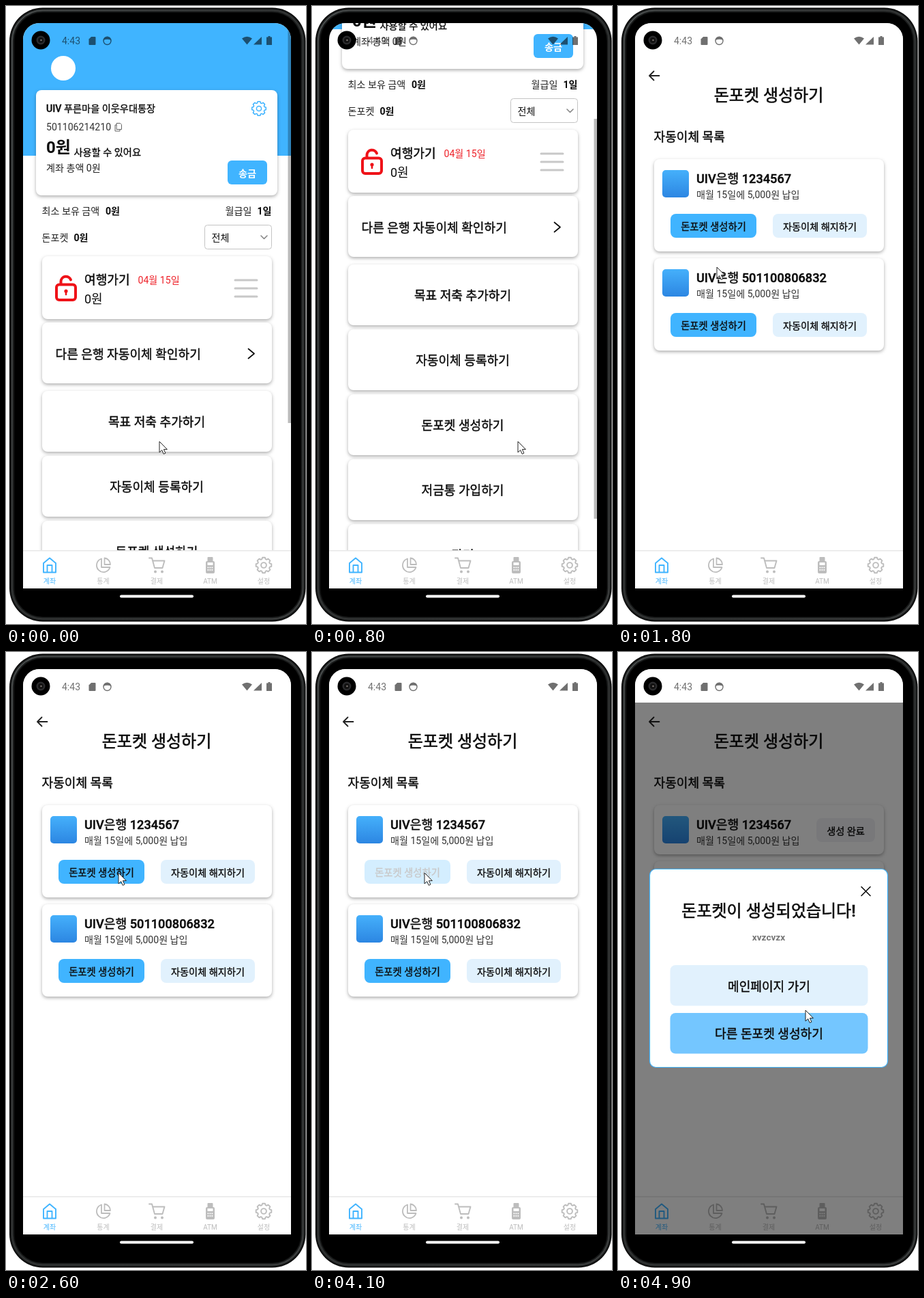
An HTML page for the animation above (5000 ms loop, 440 by 904 pixels).

```html
<!DOCTYPE html>
<html lang="ko">
<head>
<meta charset="utf-8">
<style>
html, body { margin: 0; width: 100%; height: 100%; overflow: hidden; background: #fff; }
svg { display: block; width: 440px; height: 904px; }
text { font-family: Roboto, "Noto Sans CJK KR", "Noto Sans CJK", sans-serif; white-space: pre; }
.card { fill: #fff; filter: drop-shadow(0 2px 2.5px rgba(0, 0, 0, .32)); }
.line { fill: none; stroke-linecap: round; stroke-linejoin: round; }
</style>
</head>
<body>
<svg id="stage" viewBox="0 0 440 904" xmlns="http://www.w3.org/2000/svg"></svg>
<script>
const BLUE = '#40b4ff', PALE = '#e1f1fd', GREY = '#bdbdbd', INK = '#0c0c0c';
const LOOP = 5000, STEP = 100;

// cy is the visual middle; medium weight gets a hairline, as Hangul has no medium cut
const text = (x, cy, size, weight, str, fill = INK, anchor = 'start') =>
  `<text x="${x}" y="${cy + size * .385}" font-size="${size}" font-weight="${weight}" fill="${fill}" text-anchor="${anchor}"` +
  (weight === 500 ? ` stroke="${fill}" stroke-width="${size * .024}"` : '') + `>${str}</text>`;
const mid = (x, cy, size, weight, str, fill) => text(x, cy, size, weight, str, fill, 'middle');
const box = (x, y, w, h, r, fill, more = '') =>
  `<rect x="${x}" y="${y}" width="${w}" height="${h}" rx="${r}" fill="${fill}" ${more}/>`;
const card = (x, y, w, h) => `<rect class="card" x="${x}" y="${y}" width="${w}" height="${h}" rx="8"/>`;
const line = (d, stroke, width) => `<path class="line" d="${d}" stroke="${stroke}" stroke-width="${width}"/>`;
const dot = (x, y, r, fill) => `<circle cx="${x}" cy="${y}" r="${r}" fill="${fill}"/>`;
const group = (id, body, more = '') => `<g id="${id}" ${more}>${body}</g>`;

function gear(x, y, r, color, width) {
  const pts = [];
  for (let i = 0; i < 8; i++) {
    for (const [off, k] of [[-.3, .8], [-.17, 1], [.17, 1], [.3, .8]]) {
      const a = i * Math.PI / 4 + off;
      pts.push((x + r * k * Math.cos(a)).toFixed(1) + ' ' + (y + r * k * Math.sin(a)).toFixed(1));
    }
  }
  return line('M' + pts.join('L') + 'Z', color, width) +
    `<circle cx="${x}" cy="${y}" r="${r * .34}" fill="none" stroke="${color}" stroke-width="${width}"/>`;
}

function menuCard(y, label) {
  return card(53, y, 337, 89) + mid(221, y + 45, 18.1, 500, label);
}

function home() {
  return box(25, -200, 393, 419, 0, BLUE) +
    dot(84, 91, 18, '#fff') +
    card(44, 123, 354, 154) +
    text(59, 150, 14.2, 500, 'UIV 푸른마을 이웃우대통장') +
    gear(371, 150, 10.5, BLUE, 1.5) +
    text(59, 177, 14.1, 400, '501106214210', '#333') +
    line('M162.500 171.500h5l2 2v7h-7zM162 174h-2v9h7v-2', '#666', 1) +
    text(59, 206, 24, 700, '0원') +
    text(99.500, 214, 14.2, 500, '사용할 수 있어요') +
    text(59, 237, 14.1, 400, '계좌 총액 0원', '#222') +
    box(325, 226, 58, 35, 6, BLUE) +
    mid(354, 245, 14.2, 700, '송금', '#fff') +
    text(52.500, 300, 14.1, 400, '최소 보유 금액', '#222') +
    text(146, 300, 14.1, 700, '0원') +
    text(321.500, 300, 14.1, 400, '월급일', '#222') +
    text(368.500, 300, 14.1, 700, '1일') +
    text(52.500, 339, 14.1, 400, '돈포켓', '#222') +
    text(99.500, 339, 14.1, 700, '0원') +
    box(291.500, 320.500, 98, 35, 4, '#fff', 'stroke="#c4c4c4"') +
    text(301.500, 339, 14.1, 400, '전체') +
    line('M374 336l4.500 4.500 4.500-4.500', '#888', 1.6) +
    card(53, 366, 337, 92) +
    box(74, 407.500, 28, 22.500, 4, 'none', 'stroke="#ef1218" stroke-width="4"') +
    line('M80.500 406v-3a7.500 7.500 0 0 1 14.500-2.500', '#ef1218', 4) +
    dot(88, 417, 2.6, '#ef1218') + line('M88 418v4', '#ef1218', 2.6) +
    text(115, 400, 18.1, 500, '여행가기') +
    text(193.500, 401, 14.1, 400, '04월 15일', '#ee2028') +
    text(115, 428, 18, 400, '0원') +
    line('M336 401h32M336 413h32M336 425h32', '#c8c8c8', 3) +
    card(53, 463, 337, 89) +
    text(72.500, 509, 18.1, 500, '다른 은행 자동이체 확인하기') +
    line('M355.500 501.500l8.500 7-8.500 7', INK, 1.7) +
    ['목표 저축 추가하기', '자동이체 등록하기', '돈포켓 생성하기', '저금통 가입하기', '관리']
      .map((s, i) => menuCard(563 + 95 * i, s)).join('');
}

function account(y, number, h, action) {
  return card(53, y, 337, h) +
    box(65, y + 16, 39, 40, 5, 'url(#tile)') +
    text(115, y + 28, 18.2, 500, 'UIV은행 ' + number) +
    text(115, y + 52, 14.1, 400, '매월 15일에 5,000원 납입', '#333') + action;
}

function actions(y, id) {
  return group(id, box(77, y + 80, 126, 35, 8, BLUE) + mid(140, y + 98.500, 14.3, 500, '돈포켓 생성하기')) +
    box(227, y + 80, 138, 35, 8, PALE) + mid(296, y + 98.500, 14.2, 500, '자동이체 해지하기');
}

function list() {
  const doneTag = box(291, 243, 86, 35, 8, '#f1f2f6') + mid(334, 262, 14.2, 500, '생성 완료');
  return box(25, 25, 393, 827, 0, '#fff') +
    line('M60.500 102H46M52.500 95.500L46 102l6.500 6.500', '#222', 1.8) +
    mid(221, 130, 24, 500, '돈포켓 생성하기') +
    text(52.500, 191, 18.1, 500, '자동이체 목록') +
    group('open', account(224, '1234567', 135, actions(224, 'press'))) +
    group('done', account(224, '1234567', 72, doneTag)) +
    group('second', account(369, '501100806832', 135, actions(369, 'other')));
}

function tabs() {
  const names = ['계좌', '통계', '결제', 'ATM', '설정'];
  return box(25, 797, 393, 55, 0, '#fff') + box(25, 796, 393, 1.5, 0, '#e8e8e8') +
    line('M55 815l9-7.500 9 7.500v13.500H55zM60.500 828v-10h7v10', BLUE, 1.9) +
    line('M140 808.500a10 10 0 1 0 12.500 12.500H140zM144.500 807.500v9.500h8.500a9.500 9.500 0 0 0-8.500-9.500z', GREY, 1.8) +
    line('M210 807.500h4l4 14.500h11.500l3-10.500h-17', GREY, 1.9) +
    dot(219, 827.500, 2, GREY) + dot(229, 827.500, 2, GREY) +
    box(293, 812, 13, 18, 2, GREY) + box(295.500, 806, 8, 7, 1, GREY) + box(295.500, 814, 8, 4, .5, '#fff') +
    [0, 1, 2, 3, 4, 5].map(i => box(295.500 + i % 3 * 3, 820.500 + (i / 3 | 0) * 3.500, 1.8, 1.8, 0, '#fff')).join('') +
    gear(378, 818, 11.500, GREY, 1.9) +
    names.map((s, i) => mid(64 + 78.500 * i, 841, 10, 400, s, i ? GREY : BLUE)).join('');
}

function status() {
  const c = '#000';
  return text(82, 51, 14, 400, '4:43', c) +
    `<path fill="${c}" d="M125 45h5.500q1 0 1 1v10q0 1-1 1h-8q-1 0-1-1v-7.500z"/>` +
    `<circle cx="148.500" cy="51" r="5.500" fill="none" stroke="${c}" stroke-width="1.4"/>` +
    `<path fill="${c}" d="M143 50a5.500 5.500 0 0 1 11 0q-5.500-2.500-11 0z"/>` +
    `<path fill="${c}" d="M346 47.500q7.500-5.500 15 0l-7.500 9zM375 45v11.500h-12z"/>` +
    `<path fill="${c}" d="M384.500 44h3v1.500h2.500V57h-8V45.500h2.500z"/>`;
}

function modal() {
  return box(25, 74, 393, 778, 0, '#000', 'fill-opacity=".5"') +
    box(46.500, 317.500, 349, 290, 9, '#fff', `stroke="${BLUE}" stroke-width="1.2"`) +
    line('M357 343.500l13 13M370 343.500l-13 13', INK, 1.6) +
    mid(221, 378, 24, 500, '돈포켓이 생성되었습니다!') +
    mid(221, 417, 13.600, 700, 'xvzcvzx', '#777') +
    box(76.500, 458, 290, 59.500, 8, PALE) + mid(221.500, 489, 18.1, 500, '메인페이지 가기') +
    box(76.500, 528, 290, 59.500, 8, '#74c6ff') + mid(221.500, 558.500, 18.1, 500, '다른 돈포켓 생성하기');
}

function phone() {
  return box(5, 2.500, 434.500, 898, 49, '#080808') +
    box(9, 6.500, 426.500, 890, 45, 'none', 'stroke="#1e2020" stroke-width="5"') +
    box(9, 6.500, 426.500, 890, 45, 'none', 'stroke="url(#rim)" stroke-width="1.500"') +
    box(13, 10, 419, 883, 41, '#000');
}

const stage = document.getElementById('stage');
stage.innerHTML = `<defs>
  <clipPath id="screen"><path d="M25 852V49a24 24 0 0 1 24-24h345a24 24 0 0 1 24 24v803z"/></clipPath>
  <linearGradient id="rim" x2="1" y2="1"><stop stop-color="#505454"/><stop offset=".5" stop-color="#343636"/><stop offset="1" stop-color="#424444"/></linearGradient>
  <linearGradient id="tile" x2="0" y2="1"><stop stop-color="#45b0fb"/><stop offset="1" stop-color="#2c86e2"/></linearGradient>
</defs>` + phone() +
  group('view',
    box(25, 25, 393, 827, 0, '#fff') +
    group('home', group('scroll', home()) + box(413.500, 25, 4.500, 585, 0, '#000', 'id="thumb" fill-opacity=".27"')) +
    group('list', list()) + tabs() +
    group('status', status(), 'opacity=".56"') + group('modal', modal()),
    'clip-path="url(#screen)"') +
  dot(51, 50, 13.500, '#000') + dot(51, 50, 6.500, '#2b2b2d') + dot(51, 50, 4, '#111') + dot(51.500, 50, 1.3, '#77706c') +
  box(167, 861.500, 108, 4, 2, '#fff') +
  group('cursor', '<path d="M0 0v16l3.700-3.400 2.500 5.700 2.700-1.200-2.500-5.500h5z" fill="#fff" stroke="#222" stroke-width="1" stroke-linejoin="round"/>');

const el = id => document.getElementById(id);
const [scroll, thumb, homeView, listView, open, done, second, press, sheet, cursor] =
  ['scroll', 'thumb', 'home', 'list', 'open', 'done', 'second', 'press', 'modal', 'cursor'].map(el);

const PATH = [[0, 225, 637], [100, 225, 637], [700, 302, 637], [1100, 302, 637], [1800, 145, 382],
  [2400, 165, 323], [4200, 165, 323], [4500, 198, 386], [4900, 275, 524]];
const OPEN_LIST = 1000, PRESS = 4000, CREATED = 4300;

const part = (t, from, to) => Math.min(1, Math.max(0, (t - from) / (to - from)));
const smooth = p => p * p * (3 - 2 * p);
const move = (node, x, y) => node.setAttribute('transform', `translate(${x} ${y})`);
const show = (node, on) => node.setAttribute('display', on ? 'inline' : 'none');

function cursorAt(t) {
  let i = 0;
  while (i < PATH.length - 2 && t >= PATH[i + 1][0]) i++;
  const [t0, x0, y0] = PATH[i], [t1, x1, y1] = PATH[i + 1];
  const p = smooth(part(t, t0, t1));
  return [x0 + (x1 - x0) * p, y0 + (y1 - y0) * p];
}

function draw(t) {
  const top = 185 * smooth(part(t, 100, 700));
  const created = t >= CREATED;
  move(scroll, 0, -top);
  move(thumb, 0, top * .757);
  show(homeView, t < OPEN_LIST);
  show(listView, t >= OPEN_LIST);
  press.setAttribute('opacity', t >= PRESS ? .22 : 1);
  show(open, !created);
  show(done, created);
  move(second, 0, created ? -63 : 0);
  show(sheet, created);
  move(sheet, 0, 784 * (1 - part(t, CREATED, CREATED + 400)) ** 2);
  move(cursor, ...cursorAt(t));
}

const start = performance.now();
function tick() {
  const t = (performance.now() - start) % LOOP;
  draw(Math.floor(t / STEP) * STEP);
  requestAnimationFrame(tick);
}
tick();
</script>
</body>
</html>
```
